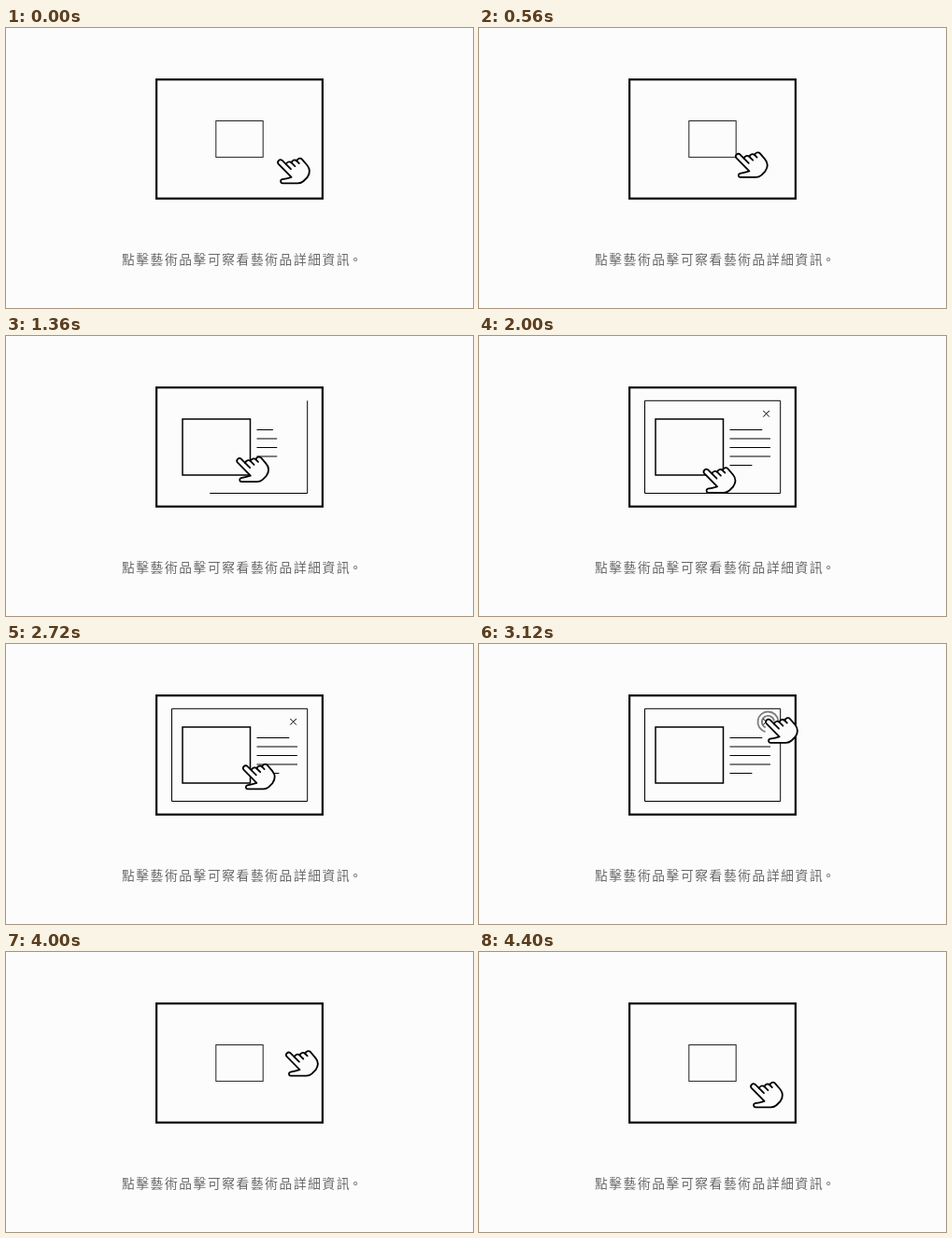
Write an HTML page that moves like this. It is 500 px wide and 300 px high and loops after 4800 ms.

```html
<!DOCTYPE html>
<html lang="zh-Hant">
<head>
<meta charset="utf-8">
<style>
  html, body { margin: 0; height: 100%; overflow: hidden; background: #fcfcfc; }
  svg { display: block; width: 500px; height: 300px; fill: none; stroke: #000; }
  text {
    font: 300 13.7px "Noto Sans CJK TC", "Noto Sans CJK", sans-serif;
    letter-spacing: 1.65px; fill: #686868; stroke: none;
  }
</style>
</head>
<body>
<svg viewBox="0 0 500 300">
  <rect x="161.1" y="55.2" width="177.8" height="127.5" stroke-width="2.2"/>
  <rect id="art"/>
  <g id="panel">
    <path id="border" d="M322.7 69.3V168.5H177.5V69.3Z" pathLength="1"/>
    <path id="lines"/>
    <path id="cross" d="M304.3 80l6.6 6.6m0-6.6l-6.6 6.6"/>
  </g>
  <g id="pointer" stroke-width="1.8">
    <g id="ring">
      <path d="M290.6 154.6A11 11 0 1 1 304.4 142.6"/>
      <path d="M290.8 150A6.6 6.6 0 1 1 300 143"/>
    </g>
    <g fill="#fcfcfc" stroke-linejoin="round" stroke-linecap="round">
      <path id="hand"/>
      <path id="creases"/>
    </g>
  </g>
  <text x="123.9" y="253.2">點擊藝術品擊可察看藝術品詳細資訊<tspan dx="-2">。</tspan></text>
</svg>
<script>
const LOOP = 4800, STEP = 80;
const el = id => document.getElementById(id);
const set = (id, attrs) => {
  for (const key in attrs) el(id).setAttribute(key, attrs[key]);
};
const ramp = (t, from, to) => Math.min(1, Math.max(0, (t - from) / (to - from)));
const mix = (a, b, k) => a + (b - a) * k;

// Pointer moves add up: [start, end, dx, dy]
const moves = [
  [400, 800, -40.5, -16], [1280, 1520, -10, 17.5],
  [2640, 3040, 66.5, -62], [3680, 4400, -16, 60.5]
];
const sumMoves = (t, axis) =>
  moves.reduce((sum, m) => sum + m[axis] * ramp(t, m[0], m[1]), 0);

// A tap ring fades in, then out
const ringAt = (t, start) =>
  ramp(t, start, start + 160) - ramp(t, start + 160, start + 320);

// Five text rows, the first and last ones shorter
function rows(grown) {
  let d = "";
  for (let i = 0; i < 5; i++) {
    const width = 43.5 * (i == 0 ? 0.8 : i == 4 ? 0.55 : 1);
    d += `M268.5 ${100.5 + i * 9.5}h${width * grown}`;
  }
  return d;
}

function buildHand() {
  const dx = 5.7, dy = -1.8;
  const knuckle = `a3.3 3.3 0 0 1 ${dx} ${dy}`;
  set("hand", {
    d: "M305.6 159.8L291.6 145.6a2.8 2.8 0 0 1 3.9-3.9L300 146.2" + knuckle.repeat(3) +
      "L322.4 147Q327.4 153 322.6 160L318.6 164Q316 166.3 312.6 166.3" +
      "H296a2.1 2.1 0 0 1-.5-4.1Q300 161.4 305.6 159.8Z"
  });
  set("creases", {
    d: [0, 1, 2].map(i => {
      const length = 5 - i * 1.3;
      return `M${300 + i * dx} ${146.2 + i * dy}l${length} ${length}`;
    }).join("")
  });
}

function draw(t) {
  const closing = ramp(t, 3200, 3600);
  const size = ramp(t, 960, 1280) - closing;
  set("art", {
    x: mix(224.8, 189, size), y: mix(99.5, 89, size),
    width: mix(50.4, 72.5, size), height: mix(38.9, 60, size),
    "stroke-width": mix(1, 1.5, size), stroke: size ? "#000" : "#222"
  });

  const drawn = ramp(t, 960, 1920);
  set("panel", { opacity: drawn ? 1 - closing : 0 });
  set("border", { "stroke-dasharray": drawn < 1 ? drawn + " 2" : "none" });
  set("lines", { d: rows(ramp(t, 1200, 1520)) });
  set("cross", { opacity: ramp(t, 1840, 2000) });

  set("pointer", { transform: `translate(${sumMoves(t, 2)} ${sumMoves(t, 3)})` });
  set("ring", { opacity: ringAt(t, 800) + ringAt(t, 3040) });
}

function frame() {
  const t = performance.now() % LOOP;
  draw(Math.floor(t / STEP) * STEP);
  requestAnimationFrame(frame);
}
buildHand();
frame();
</script>
</body>
</html>
```
